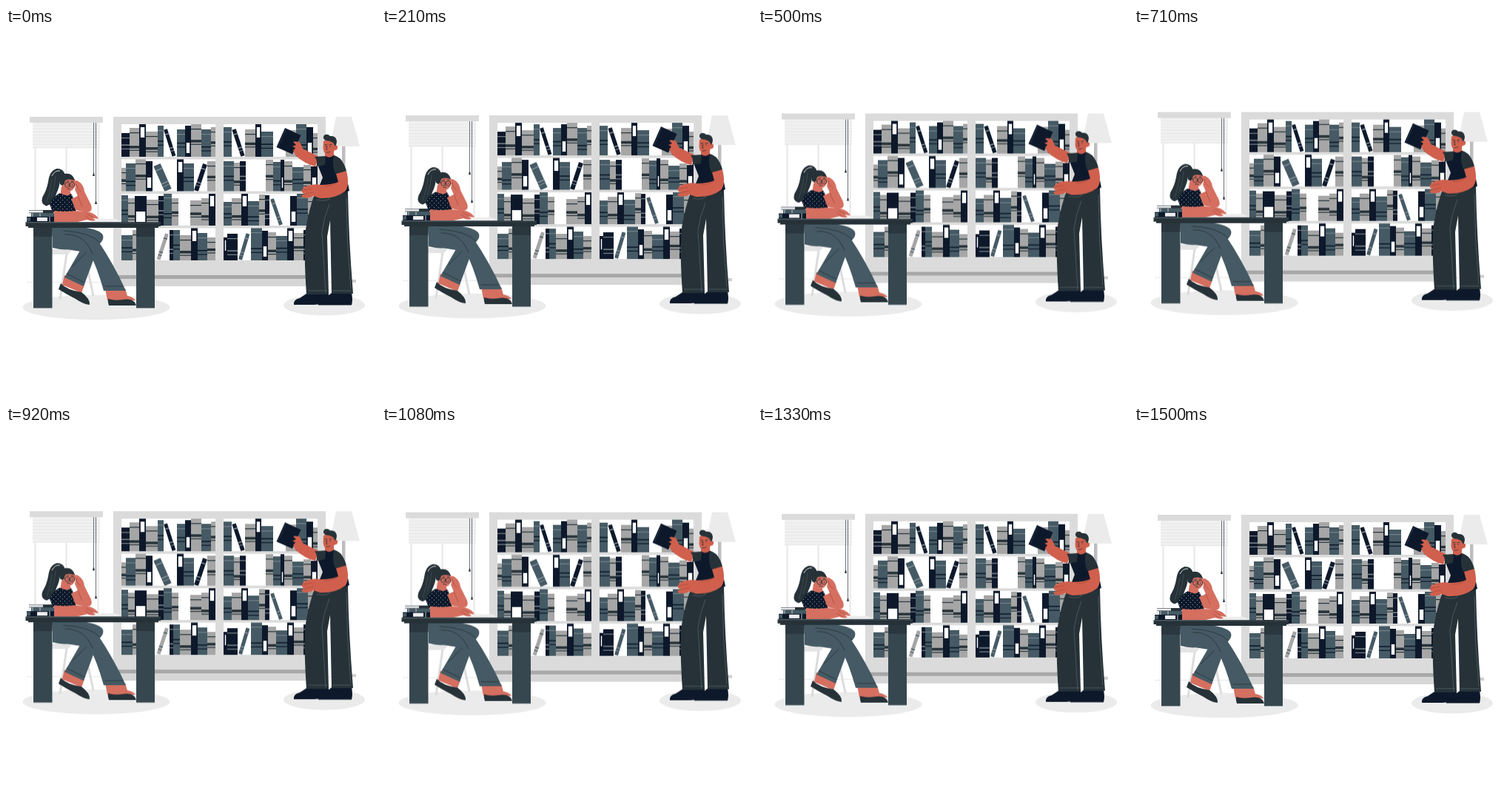
Animation of 500 by 500 pixels, one loop 1.54 s. Source, as an HTML page:

```html
<!DOCTYPE html>
<html lang="en">
<head>
<meta charset="utf-8">
<title>Library</title>
<style>
html, body { margin: 0; width: 100%; height: 100%; overflow: hidden; background: #fff; }
svg { display: block; width: 100vw; height: 100vh; }
.pale { fill: #ebebeb; }
.frame { fill: #dbdbdb; }
.navy { fill: #0d192b; }
.dark { fill: #263238; }
.desk { fill: #37474f; }
.slate { fill: #455a64; }
.skin { fill: #d0604d; }
.fair { fill: #d56f60; }
.line { fill: none; stroke: #263238; stroke-width: .8; stroke-linecap: round; stroke-linejoin: round; }
.seam { fill: none; stroke: #56676f; stroke-width: .7; }
.fold { fill: none; stroke: #a84938; stroke-width: .7; stroke-linecap: round; }
</style>
</head>
<body>
<svg viewBox="0 0 500 500">
<defs>
  <pattern id="dots" width="6" height="6" patternUnits="userSpaceOnUse">
    <rect width="6" height="6" fill="#0d192b"/>
    <circle cx="1.5" cy="1.5" r=".5" fill="#c5cad0"/><circle cx="4.5" cy="4.5" r=".5" fill="#c5cad0"/>
  </pattern>
</defs>
<g id="scene">
  <ellipse class="pale" cx="122" cy="377.500" rx="99.500" ry="16.800"/>
  <ellipse class="pale" cx="430" cy="374.500" rx="55" ry="14"/>
  <path d="M28 343.500H473" stroke="#e2e2e2" stroke-width=".8"/>

  <!-- window -->
  <path d="M39.500 162V343M81.500 162V262M124.500 128V262" stroke="#e6e6e6" stroke-width="2"/>
  <rect x="36" y="127" width="91" height="35.500" fill="#f1f1f1"/>
  <path id="slats" stroke="#e2e2e2" stroke-width=".7"/>
  <rect class="frame" x="32" y="120" width="99" height="8"/>
  <path d="M118.500 128V198M121.500 128V236" stroke="#45505a" stroke-width=".8"/>
  <path class="dark" d="M118 196h1l1 4h-3zM121 234h1l1 4h-3z"/>

  <!-- lamp -->
  <path class="pale" d="M446 120H467L478 160H438z"/>
  <path fill="#bdbdbd" d="M454 160h4.500v181h-4.500z"/>
  <path fill="#cfcfcf" d="M440 340h33v4h-33z"/>

  <!-- bookcase -->
  <path class="frame" d="M145 120H432V334H145z"/>
  <path fill="#a8a8a8" d="M145 334H432V339H145z"/>
  <path fill="#d6d6d6" d="M145 339H432V349H145z"/>
  <path fill="#fff" d="M156 130H283V314H156zM294 130H421V314H294z"/>
  <g id="books"></g>
  <path class="frame" d="M156 174H283V177.500H156zM294 174H421V177.500H294zM156 220.500H283V224H156zM294 220.500H421V224H294zM156 267H283V270.500H156zM294 267H421V270.500H294z"/>

  <!-- chair -->
  <path fill="#e4e4e4" d="M61 299H88Q88 306 80 306H61z"/>
  <path d="M82 305L73 367M106 305L118 362" stroke="#dcdcdc" stroke-width="3"/>

  <!-- seated legs -->
  <path class="fair" d="M79 334L106 347L102 358L76 347z"/>
  <path class="dark" d="M74 345Q82 354 102 357Q114 366 113 374Q104 373 94 366Q82 360 71 353z"/>
  <path class="slate" d="M63 268H90Q126 270 131 280Q133 286 126 292L105 349L79 337L104 294Q84 303 63 297z"/>
  <path class="line" stroke-width=".6" d="M82 332L106 344M90 322L113 299"/>
  <path class="fair" d="M134 352H161L164 362Q171 363 175 368H137z"/>
  <path class="dark" d="M138 366Q148 369 162 366.500Q174 366 176 375H139Q137 370 138 366z"/>
  <path class="slate" d="M62 270H80Q114 274 124 287Q145 318 162 355H132Q123 323 113 304Q87 300 64 296z"/>
  <path class="line" stroke-width=".6" d="M78 274Q114 276 127 290M134 349H158M80 279Q106 278 117 305"/>

  <!-- seated reader -->
  <path class="dark" d="M80 199Q78 190 69 190Q59 192 57 208Q55 219 49.500 228Q46 238 55 240.500Q65 237 68 224Q73 213 73 205Q75 198 79 202z"/>
  <path d="M62 200Q66 192 73 193" fill="none" stroke="#fff" stroke-width=".8"/>
  <path d="M62 205Q60 222 55 235M67 200Q66 215 61 228" fill="none" stroke="#53626a" stroke-width=".5"/>
  <path class="fair" d="M75 214L86 218L90 232L73 228z"/>
  <path d="M73 223Q82 229 88 224Q92 230 92 238L95 249H63L59 238Q64 227 73 223z" fill="url(#dots)"/>
  <path class="fair" d="M77 201Q88 197 93 205L94 211Q92 220 85 221Q77 220 75 211z"/>
  <path class="dark" d="M73 211Q70 200 79 197Q90 195 93 206Q84 203 80 206Q79 211 76 213z"/>
  <circle class="line" cx="83" cy="212" r="3.300"/>
  <circle class="line" cx="89.500" cy="212" r="3.300"/>
  <path class="line" d="M76 210L80 211M86.100 211.500h.5M82 207.500l3-.7M88 207l3 .5M83 217.500q2-1 4 0"/>
  <circle class="dark" cx="84" cy="212.200" r=".7"/><circle class="dark" cx="89.500" cy="212.200" r=".7"/>
  <path class="fair" d="M92 208Q94 204 99 208Q105 212 106 221L115 239Q118 248 110 249L94 246L88 231L97 227L93 218Q95 213 92 208z"/>
  <path class="fold" d="M95 211Q96 217 101 221M97 227L103 241"/>
  <path class="fair" d="M65 247Q80 249 92 247L108 248Q119 249 125 257Q122 259 117 256L121 260Q116 262 110 259L97 262H65z"/>
  <path class="fold" d="M109 251L118 256M107 254L114 259"/>

  <!-- desk -->
  <path fill="#ededed" d="M118 262Q125 256 138 258Q147 256 155 261V263H118z"/>
  <path class="desk" d="M37 269H62.500V378.500H37zM176 269H201V378.500H176z"/>
  <path class="dark" d="M37 268H62.500V282H37zM176 268H201V282H176z" opacity=".75"/>
  <path class="dark" d="M26.500 262.300H209V268H206V270H30V268H26.500z"/>
  <path d="M27 263.200H209" stroke="#45555e" stroke-width=".7"/>
  <path class="navy" d="M28 255H65V262H28zM31 246H54V250H31z"/>
  <path fill="#eee" d="M31 246.500H50V249.500H31zM30 250H40V254.500H30zM42 256H56V261H42z"/>
  <path class="slate" d="M34 250H65V255H34zM28 256H33V261H28z"/>
  <path class="dark" d="M50 246h14v4h-14z"/>
  <path d="M36 250v5M46 250v5M59 255v7" stroke="#bfc5c8"/>

  <!-- standing reader -->
  <path class="navy" d="M389 374Q388 367 397 365L409 357H436V367Q428 374 416 374zM422 374.500Q421 368 430 366L440 358H467Q469 367 467 374.500z"/>
  <path class="dark" d="M418 222L462 220Q463 284 469 359H440L438 260L434 282L436 360H406Q402 300 405 272Q410 242 418 222z"/>
  <path class="seam" d="M437 238Q429 258 427 276L432 358M420 232Q433 235 438 230M441 355H467M408 355H434M460 230Q460 290 466 352"/>
  <path class="skin" d="M389 151Q397 150 401 163L423 174L418 187Q404 184 391 172L387 162z"/>
  <path class="navy" d="M377 135L398.500 145L387 170.500L365.500 161z"/>
  <path d="M378 137L368 160" stroke="#33404f" stroke-width=".7"/>
  <path class="skin" d="M388 154Q395 151 399 160L398 170Q390 170 388 165L393 163L387 160L392 158z"/>
  <path class="skin" d="M431 165H443V177Q436 180 431 175z"/>
  <path class="navy" d="M432 173Q437 177 443 172L452 177Q460 190 461 205L464 220Q441 230 419 225L428 202L422 187z"/>
  <path class="dark" d="M432 173L417 174Q422 180 419 187L431 185zM443 172Q455 175 460 193L445 197Q440 186 443 172z"/>
  <path class="skin" d="M446 197L460 193Q465 213 458 221Q444 231 424 230L416 227Q408 231 401 229L399 226L405 224Q399 224 400 219Q402 214 408 213Q417 210 425 212Q440 212 449 208z"/>
  <path class="fold" d="M402 219L413 217M405 224L415 222M449 208Q443 214 431 214"/>
  <g transform="translate(0 1)">
    <path class="skin" d="M429 152Q436 147 444 153L445 158Q449 157 448 162Q446 165 444 164Q442 171 436 171.500Q429 169 428.500 161z"/>
    <path class="dark" d="M432 151Q427 148 430 144Q434 141 438 145Q446 144 447 152Q447 156 445 159L442 154Q437 151 432 151z"/>
    <path class="line" d="M431 156.500l3 .4M437 156.800l3-.5M434 159l-1.500 4h2M433 167q3 1 5-1"/>
    <circle class="dark" cx="432.500" cy="159" r=".7"/><circle class="dark" cx="438" cy="159" r=".7"/>
  </g>
</g>
</svg>
<script>
const NS = 'http://www.w3.org/2000/svg';
const tone = { g: '#a6a6a6', s: '#455a64', n: '#0d192b', w: '#fff' };
const books = document.getElementById('books');

function add(tag, attrs) {
  const el = document.createElementNS(NS, tag);
  for (const key in attrs) el.setAttribute(key, attrs[key]);
  books.append(el);
}

const box = (x, y, width, height, fill) => add('rect', { x, y, width, height, fill });

// g, s, n: plain spines; T and B: navy spines with a white label high or low; _: a gap
function row(x, floor, spec) {
  spec.split(' ').forEach((item, i) => {
    const kind = item[0];
    const [w, h = 0] = item.slice(1).split(':').map(Number);
    const y = floor - h;
    if (kind === 'T' || kind === 'B') {
      box(x, y, w, h, tone.n);
      box(x + 1.8, kind === 'T' ? y + 4 : floor - 19, w - 3.6, 14, tone.w);
    } else if (kind !== '_') {
      box(x, y, w, h, tone[kind]);
      const band = kind === 'g' ? '#263238' : kind === 's' ? tone.n : '#778289';
      const low = y + h * (i % 2 ? .62 : .48);
      box(x, low, w, kind === 'g' ? 3.5 : 1.6, band);
      box(x, low + 5.5, w, 1.2, band);
      box(x, y + 6, w, 1.2, kind === 's' ? '#73838b' : band);
    }
    x += w;
  });
}

function lean(x1, y1, x2, y2, width, kind) {
  const at = { x1, y1, x2, y2, 'stroke-width': width };
  add('line', { ...at, stroke: tone[kind] });
  add('line', { ...at, stroke: kind === 'g' ? tone.s : '#84909a', 'stroke-dasharray': '0 6 1.500 18 1.500 3 1 40' });
}

row(156, 174, 'n11:32 g13:39 T9:44 g16:34 s8:42 _18 s11:37 B8:42 g14:44 s13:37 g6:40');
row(294, 174, 's11:40 _18 g14:37 T8:44 s16:34 _17 g14:36 s14:44 B9:40 g6:32');
row(156, 221, 'g6:32 s13:38 g14:44 B9:41 _33 T9:44 s14:38 _18 g11:41');
row(294, 221, 's14:41 g8:39 n8:41 _27 g10:43 s10:40 B5:43 g11:41 s15:33 g10:36 B9:34');
row(156, 267, 's9:41 g9:37 B16:40 g16:35 n7:40 s11:44 g9:37 _16 g15:34 g10:37 T9:44');
row(294, 267, 's11:32 g13:37 T9:44 s15:33 g8:42 n6:41 _28 B9:40 s15:44 g13:39');
row(156, 314, 's15:34 g5:41 n10:40 s14:36 _21 n5:41 s9:41 g15:34 T9:44 s13:37 g11:31');
row(294, 314, 'T5:31 n14:36 _18 s15:44 B8:40 g11:38 s15:33 T9:44 g13:37 n9:41 s10:36');

lean(215.500, 137, 227, 173, 5, 'n');
lean(308, 137, 320, 173, 5.500, 'n');
lean(204, 185, 219, 219, 10, 's');
lean(269, 184, 257, 220, 6, 'n');
lean(359.500, 231, 371.500, 266, 5, 's');
lean(217.500, 278, 206, 313, 5, 'g');
lean(327, 278, 316.500, 313, 5, 's');

document.getElementById('slats').setAttribute('d',
  Array.from({ length: 8 }, (_, i) => `M36 ${132 + i * 4.2}H127`).join(''));

const float = [[0, 0], [725, -6.5], [1475, 0], [1540, 0]];
const loop = 1540;
document.getElementById('scene').animate(
  float.map(([t, y]) => ({ offset: t / loop, transform: `translateY(${y}px)` })),
  { duration: loop, iterations: Infinity, easing: 'linear' });
</script>
</body>
</html>
```
